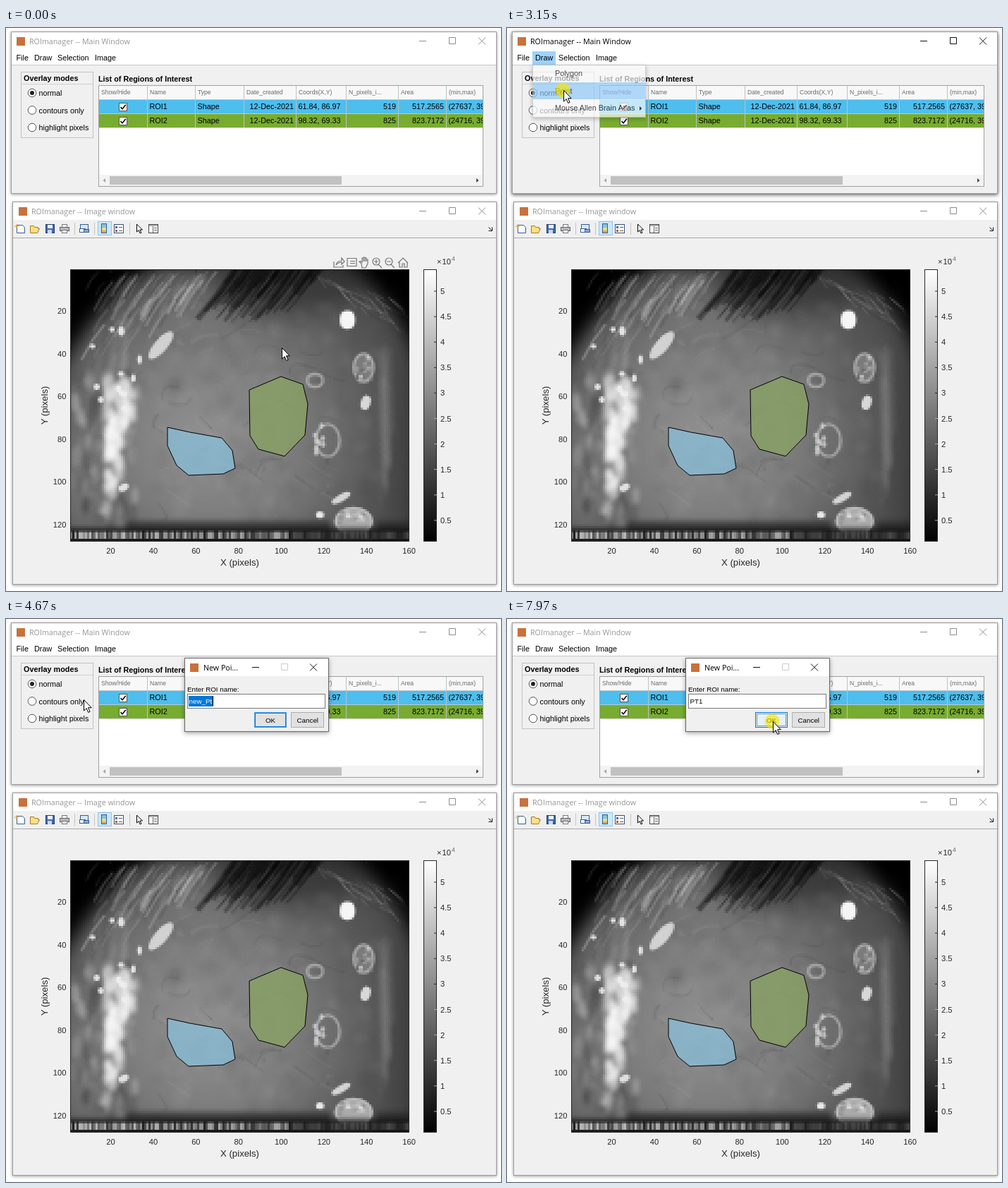
Recreate the animation shown at these times as an HTML page with a canvas. Size 702 by 798 pixels, loop 8000 ms.

```html
<!DOCTYPE html>
<html lang="en">
<head>
<meta charset="utf-8">
<title>ROImanager</title>
<style>
  html, body { margin: 0; width: 100%; height: 100%; overflow: hidden; background: #fff; }
  #stage { position: relative; width: 702px; height: 798px; overflow: hidden; }
  #stage > * { position: absolute; left: 0; top: 0; }
  #stage > #photo { left: 91px; top: 342px; width: 481px; height: 385px; image-rendering: pixelated; }
  text { font-family: "Liberation Sans", Arial, sans-serif; font-size: 10.8px; fill: #000; white-space: pre; }
  .title { font-family: "Open Sans", "Noto Sans", sans-serif; font-size: 10.7px; }
  .dim { fill: #969696; }
  .bold { font-weight: bold; }
  .head { font-size: 8.6px; fill: #6a6a6a; }
  .tick { font-size: 11.2px; fill: #262626; }
  .axis { font-size: 13.2px; fill: #262626; }
  .small { font-size: 9.8px; }
  .end { text-anchor: end; }
  .mid { text-anchor: middle; }
  .shade { filter: drop-shadow(0 1px 2px rgba(0, 0, 0, .4)); }
  .lift { filter: drop-shadow(0 2px 3px rgba(0, 0, 0, .35)); }
  #tools { fill: none; stroke: #747474; stroke-width: 1.2; }
  #dialog { transform-origin: 355px 107px; }
</style>
</head>
<body>
<div id="stage">
  <svg id="back" width="702" height="798"></svg>
  <canvas id="photo" width="160" height="128"></canvas>
  <svg id="front" width="702" height="798"></svg>
</div>
<script>
const $ = id => document.getElementById(id);

// ---------- drawing helpers ----------
const box = (x, y, w, h, fill, stroke, extra = '') => stroke
  ? `<rect x="${x + .5}" y="${y + .5}" width="${w - 1}" height="${h - 1}" fill="${fill}" stroke="${stroke}" ${extra}/>`
  : `<rect x="${x}" y="${y}" width="${w}" height="${h}" fill="${fill}" ${extra}/>`;
const txt = (x, y, s, cls = '', extra = '') => `<text x="${x}" y="${y}" class="${cls}" ${extra}>${s}</text>`;
const path = (d, stroke = '#000', fill = 'none', extra = '') =>
  `<path d="${d}" stroke="${stroke}" fill="${fill}" ${extra}/>`;
const group = (id, ...parts) => `<g id="${id}">${parts.join('')}</g>`;
const hidden = 'opacity="0"';
const mark = (x, y) => box(x - 6, y - 6, 12, 12, '#c9713c');
const winButtons = (x, y, gap, color, maxColor = color) =>
  path(`M${x} ${y}.5h10`, color) +
  path(`M${x + gap + .5} ${y - 4.5}h9v9h-9z`, maxColor) +
  path(`M${x + 2 * gap} ${y - 4.5}l10 10m0 -10l-10 10`, color);

// data units to stage pixels
const px = v => 88 + v * 3.023;
const py = v => 340 + v * 3.025;

// ---------- windows ----------
function toolbar() {
  const ink = '#345d96';
  return path('M97.5 276v17M125.5 276v17M175.5 276v17', '#c4c4c4') + box(130, 274, 20, 20, '#cce8ff', '#8cc5ee') +
    path('M15.5 279.5h8l3 3v8h-11z', ink, '#fff') + path('M12 281h6m-3 -3v6', '#f09a28') +
    path('M34.5 290.5v-10h5l1 2h5v2l2 0l-3 6z', '#a87b16', '#ffe08a') +
    box(56, 278, 13, 13, '#3e69ad', '#243f73') + box(59, 279, 7, 5, '#eef4fb') + box(59, 286, 6, 5, '#cdd6e4') +
    box(79, 278, 8, 5, '#fff', '#777') + box(76, 282, 14, 6, '#b9bcc2', '#5e6269') + box(79, 286, 8, 5, '#fff', '#777') +
    box(105, 278, 12, 8, '#dce8f6', ink) + box(104, 284, 9, 6, '#fff', ink) + box(110, 285, 8, 5, '#8aa8cf', ink) +
    box(135, 277, 8, 14, '#8fc3d9', ink) + box(136, 283, 6, 4, '#d8e58a') + box(136, 287, 6, 3, '#f4a35b') +
    box(153, 278, 14, 13, '#fff', '#3c4f70') + box(155, 281, 3, 3, '#2f6fc0') + box(155, 286, 3, 3, '#c4572c') +
    path('M160 282.5h5M160 287.5h5', '#555') +
    path('M185.5 278v11l2.6 -2.4 2 4.4 1.8 -.8 -2 -4.2h3.6z', '#000', '#fff') +
    box(202, 278, 14, 13, '#fff', '#444') + path('M203 280h12M208.5 281v9M210 283.5h4M210 286.5h4', '#666') +
    path('M684.5 282.5l4 4m1 -4v5h-5', '#111');
}

function imageWindow() {
  let s = box(9, 246, 687, 543, '#f0f0f0', '#9b9b9b', 'class="shade"') + box(10, 247, 685, 25, '#fff') +
    mark(24, 260) + txt(36, 264, 'ROImanager -- Image window', 'title dim') + winButtons(586, 259, 42, '#8c8c8c') +
    path('M10 297.5H695', '#a8a8a8') + toolbar() +
    '<linearGradient id="ramp" x2="0" y2="1"><stop stop-color="#fff"/><stop offset="1" stop-color="#000"/></linearGradient>' +
    box(592, 342, 19, 386, 'url(#ramp)', '#262626');
  for (let v = .5; v <= 5; v += .5) {
    const y = 734 - v * 72.2;
    s += txt(616, y + 4, v, 'tick') + path(`M607 ${y}h4`, v < 3 ? '#aaa' : '#262626');
  }
  for (let v = 20; v <= 160; v += 20) s += txt(px(v), 745, v, 'tick mid');
  for (let v = 20; v <= 120; v += 20) s += txt(85.5, py(v) + 4.5, v, 'tick end');
  return s + txt(611, 335, '×&#8202;10', 'tick') + txt(632, 330, '4', 'head') +
    txt(331.5, 762, 'X (pixels)', 'axis mid') +
    txt(0, 0, 'Y (pixels)', 'axis mid', 'transform="translate(59 535) rotate(-90)"');
}

function table() {
  const edges = [131, 200, 268, 337, 411, 482, 556, 624];
  const heads = ['Show/Hide', 'Name', 'Type', 'Date_created', 'Coords(X,Y)', 'N_pixels_i...', 'Area', '(min,max)'];
  const rows = [
    ['ROI1', 'Shape', '12-Dec-2021', '61.84, 86.97', '519', '517.2565', '(27637, 39'],
    ['ROI2', 'Shape', '12-Dec-2021', '98.32, 69.33', '825', '823.7172', '(24716, 39']];
  const toRight = /^(\d+|\d+\.\d+|\d+-.*)$/;
  let s = box(131, 81, 546, 144, '#fff', '#a0a0a0') + box(132, 82, 544, 19, '#f8f8f8');
  heads.forEach((h, i) => s += txt(edges[i] + 4, 94, h, 'head'));
  rows.forEach((row, r) => {
    const y = 101 + r * 20;
    s += box(132, y, 544, 20, ['#4dbeee', '#77ac30'][r]) + path(`M132 ${y + .5}H676`, '#c0c9cc') +
      box(160, y + 5, 12, 12, '#fff', '#555') + path(`M162.5 ${y + 11}l2.5 2.8 4.8 -6`, '#000', 'none', 'stroke-width="1.5"');
    row.forEach((cell, i) => s += toRight.test(cell)
      ? txt(edges[i + 2] - 3, y + 14, cell, 'end')
      : txt(edges[i + 1] + 3.5, y + 14, cell));
  });
  edges.slice(1).forEach(x => s += path(`M${x + .5} 82v59`, '#b9c3c8'));
  return s + path('M132 141.5H676', '#ddd') + box(676, 100, 1, 42, '#a0a0a0') + box(677, 100, 14, 42, '#f0f0f0') +
    box(132, 208, 544, 16, '#f3f3f3') + box(147, 210, 329, 12, '#c1c1c1') +
    path('M141 213v6l-3.5 -3z', 'none', '#a3a3a3') + path('M667 213v6l3.5 -3z', 'none', '#444');
}

function mainWindow() {
  const name = 'ROImanager -- Main Window';
  let s = box(7, 5, 689, 230, '#f0f0f0', '#777', `class="lift" id="lift" ${hidden}`) +
    box(7, 5, 689, 230, '#f0f0f0', '#9b9b9b', 'class="shade"') +
    box(8, 6, 687, 46, '#fff') + path('M8 52.5H695', '#c8c8c8') + mark(21, 19) +
    group('idle', txt(33, 23, name, 'title dim'), winButtons(586, 18, 42, '#8c8c8c')) +
    `<g id="active" ${hidden}>${txt(33, 23, name, 'title')}${winButtons(586, 18, 42, '#111')}</g>` +
    box(36, 33, 33, 19, '#9fd3fb', '', `id="drawHot" ${hidden}`) +
    box(70, 33, 47, 19, '#9fd3fb', '', `id="selectHot" ${hidden}`) +
    txt(14.5, 46, 'File') + txt(40, 46, 'Draw') + txt(73, 46, 'Selection') + txt(126, 46, 'Image') +
    box(21, 62, 103, 94, '#f0f0f0', '#c2c2c2') + path('M22 79.5H123', '#cfcfcf') + txt(25, 75, 'Overlay modes', 'bold');
  ['normal', 'contours only', 'highlight pixels'].forEach((label, i) => {
    const y = 92 + i * 24.5;
    s += `<circle cx="37" cy="${y}" r="5.8" fill="#fff" stroke="#555"/>` +
      (i ? '' : `<circle cx="37" cy="${y}" r="3" fill="#222"/>`) + txt(46.5, y + 4, label);
  });
  return s + txt(131, 76, 'List of Regions of Interest', 'bold') + table();
}

function menu() {
  return `<g id="menu" ${hidden}>` + box(36, 52, 161, 75, '#f9f9f9', '#bdbdbd', 'class="lift"') +
    box(37, 53, 159, 24, '#91c9f7', '', `id="polygonHot" ${hidden}`) +
    box(37, 77, 159, 24, '#91c9f7', '', `id="pointHot" ${hidden}`) +
    ['Polygon', 'Point', 'Mouse Allen Brain Atlas'].map((s, i) => txt(68, 68 + i * 24.6, s)).join('') +
    path('M188 111v6l3.2 -3z', 'none', '#000') + '</g>';
}

function dialog() {
  return `<g id="dialog" ${hidden}>` + box(253, 55, 205, 105, '#f0f0f0', '#666', 'class="lift"') + box(254, 56, 203, 25, '#fff') +
    mark(267, 69) + txt(280, 73, 'New Poi...', 'title') + winButtons(349, 68, 41, '#111', '#ccc') +
    txt(257, 103, 'Enter ROI name:', 'small') + box(257, 106, 196, 21, '#fff', '#7a7a7a') +
    box(259, 109, 35, 15, '#0078d7', '', 'id="chosen"') +
    typing.map(([, s], i) => txt(259.5, 120, s, 'small', `id="typed${i}" ${i ? hidden : 'style="fill:#fff"'}`)).join('') +
    group('caret', box(0, 109, 1, 14, '#000', '', 'id="blink"')) +
    box(352, 132, 46, 22, '#e1e1e1', '#4b9cdb') + box(353, 133, 44, 20, 'none', '#0078d7', 'id="pulse"') +
    box(352, 132, 46, 22, '#e5f1fb', '#0078d7', `id="okHot" ${hidden}`) +
    box(354, 134, 42, 18, 'none', '#333', `id="focus" stroke-dasharray="1 1" ${hidden}`) +
    txt(375, 147, 'OK', 'small mid') + box(404, 132, 47, 22, '#e1e1e1', '#adadad') + txt(427.8, 147, 'Cancel', 'small mid') + '</g>';
}

function overlays() {
  let s = box(91, 342, 481, 386, 'none', '#262626');
  for (let v = 20; v < 160; v += 20) s += path(`M${px(v)} 723v4M${px(v)} 343v4`, '#262626');
  const lens = x => `<circle cx="${x}" cy="331" r="5"/><path d="M${x + 3} 335l5 5M${x - 3} 331h6"/>`;
  return s +
    path('M229 566l32 7 45 8 15 18 4 25 -17 8 -49 2 -17 -14 -13 -28z', '#000', 'rgba(139,190,216,.78)') +
    path('M345 513l45 -19 31 11 7 28 -4 44 -29 30 -37 -10 -12 -19z', '#000', 'rgba(138,162,100,.78)') +
    group('tools',
      '<path d="M465 331v8h13v-3M468 336q1 -6 8 -6v-4l4 5 -4 4v-3q-5 0 -8 4z"/>',
      '<path d="M484 326.5h13v11h-13zM488 330.5h7M488 333.5h7"/>',
      '<path d="M504 334l-3 -3q2 -1 4 1v-6h2v-1h2v1h2v2h2v6l-3 6h-5zM507 326v5M509 326v5M511 327v4"/>',
      lens(525), '<path d="M525 328v6"/>', lens(543),
      '<path d="M556 333l7 -7 7 7M558 332v7h4v-5h3v5h4v-7"/>');
}

const pointer = '<g id="cursor"><circle id="halo" r="10.5" cx="-1" fill="#f5e500" fill-opacity=".65" opacity="0"/>' +
  path('M.5 .5v15.5l3.6 -3.4 2.6 5.8 2.4 -1 -2.6 -5.7h4.7z', '#000', '#fff') + '</g>';

const typing = [[4670, 'new_Pt'], [4950, 'P'], [5230, 'PT'], [5580, 'PT1']];

$('back').innerHTML = imageWindow();
$('front').innerHTML = overlays() + mainWindow() + menu() + dialog() + pointer;

// ---------- tissue picture, in soft grey shapes ----------
function paintPhoto() {
  const c = $('photo').getContext('2d');
  let seed = 11;
  const rnd = (a, b) => {
    seed = (seed * 16807) % 2147483647;
    return a + (b - a) * seed / 2147483647;
  };
  const grey = (v, a = 1) => `rgba(${v},${v},${v},${a})`;
  const soft = r => c.filter = r ? `blur(${r}px)` : 'none';
  const many = (n, draw) => { for (let i = 0; i < n; i++) draw(); };
  const oval = (x, y, rx, ry, turn) => {
    c.beginPath();
    c.ellipse(x, y, rx, ry, turn, 0, 7);
  };
  const blob = (x, y, rx, ry, v, a = 1, turn = 0) => {
    c.fillStyle = grey(v, a);
    oval(x, y, rx, ry, turn);
    c.fill();
  };
  const ring = (x, y, rx, ry) => {
    c.strokeStyle = grey(210, .55);
    c.lineWidth = 4;
    oval(x, y, rx, ry, 0);
    c.stroke();
  };
  const strand = (x, y, dx, dy, v, a, w, bend = 0) => {
    c.strokeStyle = grey(v, a);
    c.lineWidth = w;
    c.beginPath();
    c.moveTo(x, y);
    c.quadraticCurveTo(x + dx / 2 + bend, y + dy / 2 + bend, x + dx, y + dy);
    c.stroke();
  };

  c.fillRect(0, 0, 160, 128);
  c.scale(160 / 481, 128 / 385);
  c.translate(-91, -342);

  // tissue under the glass, brightest at lower left
  const glow = c.createRadialGradient(280, 580, 20, 300, 570, 330);
  [142, 124, 92, 62].forEach((v, i) => glow.addColorStop(i / 3, grey(v)));
  soft(4);
  c.fillStyle = glow;
  c.fill(new Path2D('M70 740V500Q125 390 215 335H470Q560 380 585 480V740z'));
  soft(6);
  blob(105, 640, 30, 75, 120, .7);
  blob(400, 360, 110, 45, 40, .6);
  blob(558, 580, 12, 130, 45, .6);
  blob(270, 430, 60, 45, 120, .5);

  // mottling and faint vessels
  soft(1.5);
  many(150, () => blob(rnd(190, 525), rnd(390, 695), rnd(4, 16), rnd(4, 12), rnd(0, 1) < .5 ? 50 : 185, .08, rnd(0, 3)));
  soft(.7);
  many(45, () => strand(rnd(195, 500), rnd(400, 680), rnd(-45, 45), rnd(-30, 30), rnd(0, 1) < .6 ? 60 : 175, .14, rnd(2, 4), rnd(-25, 25)));

  // fur along the upper rim
  soft(.4);
  many(80, () => {
    const x = rnd(325, 450), len = rnd(15, 80);
    strand(x, 338, -len * .75, len, 12, .35, rnd(2, 6), 3);
  });
  many(110, () => {
    const x = rnd(130, 300), len = rnd(15, 55);
    strand(x, 345 + (300 - x) * rnd(0, .75), -len * .65, len, rnd(60, 220), .35, rnd(1, 5), -3);
  });
  many(40, () => {
    const x = rnd(440, 550);
    strand(x, 350 + (x - 440) * rnd(.3, .8), rnd(8, 28), rnd(8, 22), rnd(40, 190), .3, 3);
  });

  // sparkling left margin and right wall
  soft(.9);
  many(120, () => blob(rnd(93, 185), rnd(490, 700), rnd(2, 7), rnd(4, 16), rnd(30, 235), .35));
  many(45, () => blob(rnd(140, 180), rnd(500, 565), rnd(3, 9), rnd(5, 15), 245, .5));
  many(40, () => blob(rnd(143, 163), rnd(555, 655), rnd(3, 7), rnd(6, 18), 250, .55));
  many(16, () => strand(rnd(130, 185), rnd(410, 470), rnd(-20, -5), rnd(60, 140), rnd(90, 210), .3, 3));
  many(12, () => strand(rnd(526, 546), rnd(440, 500), rnd(3, 9), rnd(120, 200), rnd(70, 200), .3, 3));
  soft(.4);
  many(12, () => blob(rnd(102, 190), rnd(425, 545), rnd(3, 5), rnd(3, 7), 240, .9));

  // highlights
  blob(220, 450, 9, 25, 220, .9, .72);
  blob(484, 414, 11, 13, 245);
  blob(510, 531, 7, 10, 230, .9, .3);
  blob(475, 666, 15, 5, 225, .9, -.5);
  blob(445, 690, 6, 5, 235);
  blob(167, 651, 8, 5, 235, .9, -.5);
  blob(507, 482, 15, 21, 130, .8);
  blob(493, 699, 27, 20, 180, .9);
  ring(507, 482, 14, 20);
  ring(456, 584, 17, 23);
  ring(438, 500, 11, 9);
  ring(493, 699, 26, 19);
  many(16, () => blob(rnd(495, 519), rnd(466, 500), 3, 3, rnd(90, 240), .7));
  many(14, () => blob(rnd(474, 512), rnd(684, 708), 4, 3, rnd(130, 250), .7));
  many(8, () => blob(rnd(438, 450), rnd(562, 604), 3, 4, 225, .7));

  // dark foot with a speckled strip
  soft(1);
  c.fillStyle = grey(35, .65);
  c.fillRect(170, 699, 290, 40);
  c.fillRect(525, 699, 60, 40);
  c.fillStyle = grey(18, .8);
  c.fillRect(85, 709, 500, 30);
  soft(0);
  for (let x = 91; x < 572; x += 3) {
    c.fillStyle = grey(Math.round(rnd(30, x < 400 ? 225 : 110)), .85);
    c.fillRect(x, 714, 3, 10);
  }
}
paintPhoto();

// ---------- timeline ----------
const LOOP = 8000, BEAT = 69;
function play(id, keys) {
  const frames = keys.map(([t, props]) => ({ offset: t / LOOP, easing: 'step-end', ...props }));
  frames.push({ ...frames.at(-1), offset: 1 });
  $(id).animate(frames, { duration: LOOP, iterations: Infinity });
}
const fade = (id, keys) => play(id, keys.map(([t, opacity]) => [t, { opacity }]));
const show = (id, from, to = LOOP) => fade(id, [[0, 0], [from, 1], ...(to < LOOP ? [[to, 0]] : [])]);
const moveTo = (x, y) => ({ transform: `translate(${x}px, ${y}px)` });

// cursor legs: start, end, goal, and a power that bends the pace
const legs = [
  [80, 830, 83, 58, 1], [900, 1240, 50, 45, 1], [1990, 2750, 80, 88, 1.6],
  [3490, 4190, 110, 114, .75], [6490, 7270, 368, 135, 1], [7340, 7550, 377, 145, 1]];
let [cx, cy] = [391, 453];
const route = [[0, moveTo(cx, cy)]];
for (const [from, to, x, y, pace] of legs) {
  const n = Math.round((to - from) / BEAT) + 1;
  for (let i = 1; i <= n; i++) {
    const p = (i / n) ** pace;
    route.push([from + (to - from) * (i - 1) / (n - 1), moveTo(cx + (x - cx) * p, cy + (y - cy) * p)]);
  }
  [cx, cy] = [x, y];
}
play('cursor', route);
fade('halo', [[0, 0], [1510, 1], [1580, 0], [3150, 1], [3220, 0], [7900, 1]]);

fade('tools', [[0, 1], [420, .5], [490, 0]]);
show('selectHot', 968, 1104);
show('drawHot', 1104, 3220);
show('lift', 1510, 3490);
show('active', 1510, 3490);
fade('idle', [[0, 1], [1510, 0], [3490, 1]]);
fade('menu', [[0, 0], [1510, .6], [1580, 1], [3150, .7], [3220, 0]]);
show('polygonHot', 2330, 2610);
show('pointHot', 2610, 3220);

// the dialog swells in over four beats
play('dialog', [0, 1, 2, 3, 4].map(i =>
  [i && 3490 + (i - 1) * BEAT, { opacity: (i / 4) ** .75, transform: `scale(${.95 + i / 80})` }]));

fade('chosen', [[0, 1], [typing[1][0], 0]]);
typing.forEach(([t], i) => show('typed' + i, i && t, typing[i + 1]?.[0]));
play('caret', [[0, { opacity: 0 }],
  ...typing.map(([t], i) => [t, { opacity: 1, ...moveTo(260 + Math.round($('typed' + i).getComputedTextLength()), 0) }]),
  [7900, { opacity: 0 }]]);

// caret blink and default-button glow share one 1 s rhythm
$('blink').animate({ opacity: [1, 0] }, { duration: 1000, delay: -400, iterations: Infinity, easing: 'steps(2, jump-none)' });
$('pulse').animate({ opacity: [.1, 1] }, { duration: 500, delay: -900, iterations: Infinity, direction: 'alternate', easing: 'ease-in-out' });
show('okHot', 7340);
show('focus', 7900);
</script>
</body>
</html>
```
